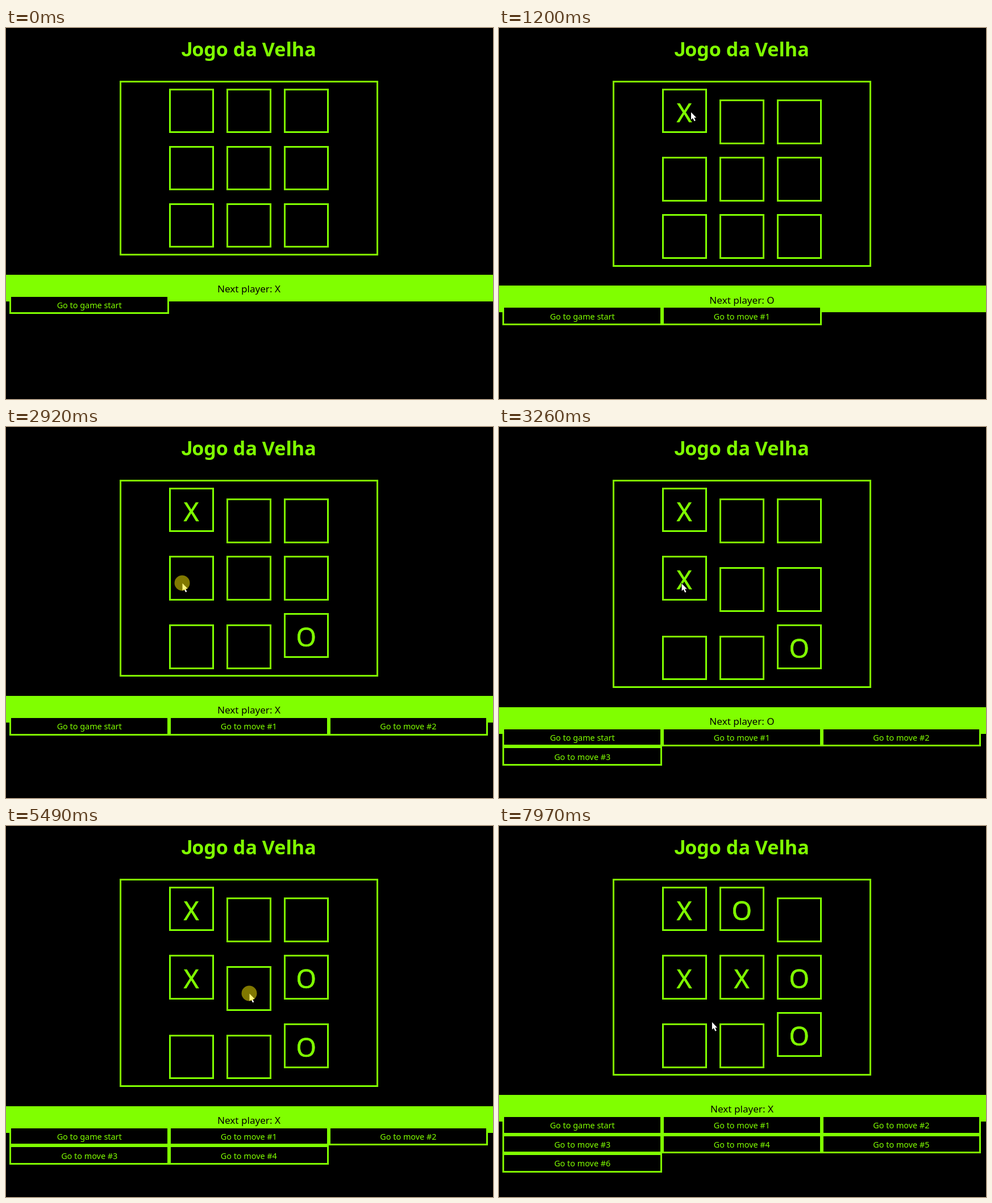
An HTML page for the animation above (8 s loop, 857 px wide and 654 px high).

```html
<!DOCTYPE html>
<html lang="pt">
<head>
<meta charset="utf-8">
<title>Jogo da Velha</title>
<style>
  html, body { margin: 0; width: 100%; height: 100%; overflow: hidden; background: #000; }
  svg { display: block; width: 100%; height: 100%; font-family: "Noto Sans", "Open Sans", sans-serif; }
  .line { fill: #000; stroke: #80ff00; stroke-width: 3; }
  .lime { fill: #80ff00; }
  .mark { font-size: 45.5px; stroke: #80ff00; stroke-width: .7; }
  .info { font-size: 17.1px; fill: #000; }
  .step { font-size: 14.4px; }
  text { text-anchor: middle; }
  .title { font-size: 34.1px; font-weight: bold; text-anchor: start; }
  .cap { font: bold 35px Roboto, sans-serif; text-anchor: end; }
</style>
</head>
<body>
<svg viewBox="0 0 857 654">
  <rect width="857" height="654"/>
  <text class="lime cap" x="328" y="50">J</text>
  <text class="lime title" x="327.2" y="50">ogo da Velha</text>
  <g id="game"></g>
  <g id="pointer">
    <path d="M0 0V13L3 10.4L5.6 15.8L7.8 14.8L5.4 9.6H9.2Z" fill="#fff" stroke="#000" stroke-width="1.6" paint-order="stroke"/>
    <circle id="press" cx="-.5" cy="-.5" r="13.5" fill="#fff000" opacity=".5"/>
  </g>
</svg>
<script>
const LOOP = 8000, TRAVEL = 700, STEP = 70;
const PITCH = 101, CELL = 78.6, SHIFT = 19.7, BUTTON_W = 280.6, BUTTON_H = 33.5;
const entry = { x: 821, y: 668 };

// The pointer leaves at go, glides to x, y along a bow, and clicks a cell.
const turns = [
  { go: 190, x: 338, y: 148.5, bow: 0, press: 1140, land: 1200, cell: 0 },
  { go: 1410, x: 518, y: 351, bow: 0, press: 2150, land: 2220, cell: 8 },
  { go: 2220, x: 310.5, y: 275.5, bow: -46, press: 2920, land: 3050, cell: 3 },
  { go: 3260, x: 518, y: 284, bow: 0, press: 4080, land: 4140, cell: 5 },
  { go: 4410, x: 428.5, y: 295.5, bow: 64, press: 5490, land: 5550, cell: 4 },
  { go: 6180, x: 440, y: 181, bow: -20, press: 7220, land: 7280, cell: 1 },
  { go: 7480, x: 365, y: 371, bow: 0 }
];

const game = document.getElementById("game");
const pointer = document.getElementById("pointer");
const press = document.getElementById("press");

const ease = p => Math.sin(p * Math.PI / 2) ** 1.5;
const snap = Math.round;
const label = (x, y, cls, s) => `<text x="${x}" y="${snap(y)}" class="${cls}">${s}</text>`;

// Outer edges sit on whole pixels, with the border inside.
function box(x, y, w, h) {
  const left = snap(x), top = snap(y);
  return `<rect class="line" x="${left + 1.5}" y="${top + 1.5}" ` +
    `width="${snap(x + w) - left - 3}" height="${snap(y + h) - top - 3}"/>`;
}

function drawGame(count) {
  const marks = Array(9).fill("");
  turns.slice(0, count).forEach((turn, i) => marks[turn.cell] = "XO"[i % 2]);

  // A partly filled row grows and its empty cells sink.
  let cells = "", drop = 0;
  for (let r = 0; r < 3; r++) {
    const row = marks.slice(r * 3, r * 3 + 3);
    const extra = row.some(Boolean) && !row.every(Boolean) ? SHIFT : 0;
    row.forEach((mark, c) => {
      const x = 286.9 + c * PITCH, y = 106.5 + r * PITCH + drop + (mark ? 0 : extra);
      cells += box(x, y, CELL, CELL);
      if (mark) cells += label(x + CELL / 2, snap(y) + 59, "lime mark", mark);
    });
    drop += extra;
  }

  const top = snap(434.7 + drop);
  let html = box(200, 92.6, 455, 308.3 + drop) + cells +
    `<rect class="lime" y="${top}" width="857" height="47"/>` +
    label(427.5, 465.8 + drop, "info", "Next player: " + "XO"[count % 2]);
  for (let i = 0; i <= count; i++) {
    const x = 6.4 + (i % 3) * BUTTON_W, y = 470.7 + drop + Math.floor(i / 3) * BUTTON_H;
    html += box(x, y, BUTTON_W, BUTTON_H) +
      label(x + BUTTON_W / 2, y + 23.2, "lime step", i ? "Go to move #" + i : "Go to game start");
  }
  game.innerHTML = html;
}

function pointerAt(t) {
  const i = turns.filter(turn => turn.go <= t).length - 1;
  if (i < 0) return null;
  const to = turns[i], from = turns[i - 1] || entry;
  const moved = Math.floor((t - to.go) / STEP) + 1;
  const p = ease(Math.min(1, moved * STEP / (TRAVEL + STEP)));
  const dx = to.x - from.x, dy = to.y - from.y;
  const side = 2 * p * (1 - p) * to.bow / Math.hypot(dx, dy);
  return [from.x + dx * p + dy * side, from.y + dy * p - dx * side];
}

let shown = -1;
function render(t) {
  const count = turns.filter(turn => turn.land <= t).length;
  if (count !== shown) drawGame(shown = count);
  const at = pointerAt(t);
  pointer.setAttribute("visibility", at ? "visible" : "hidden");
  if (at) pointer.setAttribute("transform", `translate(${at})`);
  press.style.display = turns.some(turn => turn.press <= t && t < turn.land) ? "" : "none";
}

const begin = performance.now();
function tick() {
  render((performance.now() - begin) % LOOP);
  requestAnimationFrame(tick);
}
tick();
</script>
</body>
</html>
```
